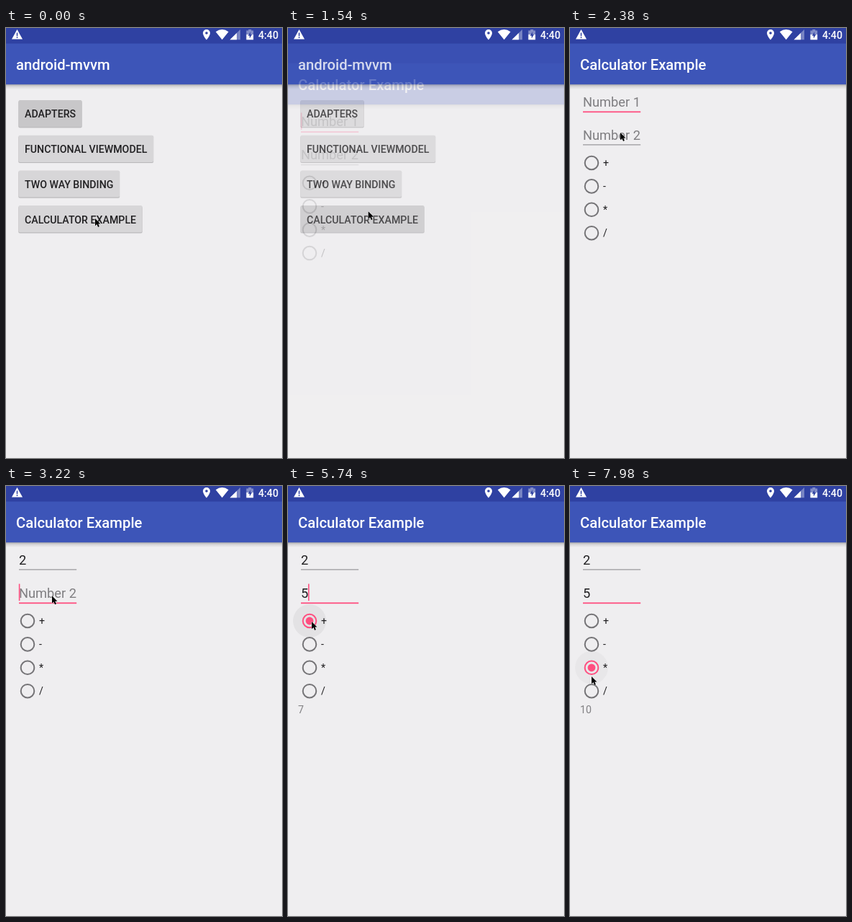
An HTML page for the animation above (8 s loop, 384 by 596 pixels).

```html
<!DOCTYPE html>
<html lang="en">
<head>
<meta charset="utf-8">
<title>Calculator Example</title>
<style>
html, body { margin: 0; width: 100%; height: 100%; overflow: hidden; background: #efeef0; }
svg { display: block; width: 100%; height: 100%; font-family: Roboto, sans-serif; }
.title { font-size: 20.3px; font-weight: 500; fill: #fff; }
.label { font-size: 14.2px; font-weight: 500; fill: #212022; }
.field { font-size: 18.27px; }
.small { font-size: 14.2px; fill: #212022; }
</style>
</head>
<body>
<svg viewBox="0 0 384 596" xmlns="http://www.w3.org/2000/svg">
  <defs>
    <linearGradient id="shade" x2="0" y2="1">
      <stop offset="0" stop-color="#000" stop-opacity=".3"/>
      <stop offset=".4" stop-color="#000" stop-opacity=".11"/>
      <stop offset="1" stop-color="#000" stop-opacity="0"/>
    </linearGradient>
    <g id="frame">
      <rect width="384" height="640" fill="#efeef0"/>
      <rect y="78" width="384" height="7" fill="url(#shade)"/>
      <rect y="-60" width="384" height="82" fill="#2f41a2"/>
      <rect y="21.5" width="384" height="56.7" fill="#3d55b8"/>
    </g>
  </defs>
  <g id="menu">
    <use href="#frame"/>
    <text class="title" x="14" y="57.8">android-mvvm</text>
  </g>
  <g id="calc">
    <use href="#frame"/>
    <text class="title" x="14" y="57.8">Calculator Example</text>
    <text id="result" class="small" x="14" y="315.4" style="fill:#838285"></text>
    <rect id="caret" width="1.6" height="23.5" fill="#ff4f80"/>
  </g>
  <g id="status" fill="#fff">
    <path d="M15.5 2L23 15.6H8z"/>
    <path d="M15.5 6.6v4.6M15.5 12.3v1.7" stroke="#2f41a2" stroke-width="1.5"/>
    <path fill-rule="evenodd" d="M279 2a5 5 0 0 1 5 5c0 3.700-5 9.500-5 9.500s-5-5.800-5-9.500a5 5 0 0 1 5-5zm0 3.200a1.800 1.800 0 1 0 0 3.600 1.800 1.800 0 0 0 0-3.600z"/>
    <path d="M291.800 5.200Q300.700-1 309.600 5.200L300.700 16.300z"/>
    <path d="M326 2v14.300H311.500z" opacity=".35"/>
    <path d="M321 7v9.300H311.500z"/>
    <path d="M337.300 2h4v1.500h2.900V9h-9.800V3.500h2.900z" opacity=".4"/>
    <path d="M334.400 9h9.800v7.300h-9.800z"/>
    <path d="M340.200 5.200l-3.500 5.600h2.200v3.800l3.300-5.700h-2z" fill="#2f41a2"/>
    <text x="351" y="14.700" font-size="14.200" font-weight="500">4:40</text>
  </g>
  <path id="mouse" d="M0 0v10.300l2.400-2.200 1.700 3.800 1.800-.8-1.600-3.600h3.200z" fill="#000" stroke="#fff" stroke-width=".8" stroke-opacity=".8" paint-order="stroke"/>
</svg>
<script>
const LOOP = 8000, PINK = '#ff4f80', GREY = '#757477';
const $ = id => document.getElementById(id);
const clamp = v => Math.max(0, Math.min(1, v));
const set = (el, attrs) => { for (const k in attrs) el.setAttribute(k, attrs[k]); };

function add(parent, tag, attrs, text) {
  const el = document.createElementNS('http://www.w3.org/2000/svg', tag);
  set(el, attrs);
  if (text) el.textContent = text;
  return parent.appendChild(el);
}

const buttons = [['ADAPTERS', 88], ['FUNCTIONAL VIEWMODEL', 187.5], ['TWO WAY BINDING', 140.5], ['CALCULATOR EXAMPLE', 172]]
  .map(([label, width], i) => {
    const y = 100 + i * 48.7, box = { x: 17.5, width, height: 37.2, rx: 2 };
    add($('menu'), 'rect', { ...box, x: 17, y: y + .6, width: width + 1, height: 38, fill: '#000', opacity: .08 });
    add($('menu'), 'rect', { ...box, y: y + 1, fill: '#b9b8ba' });
    const face = add($('menu'), 'rect', { ...box, y });
    add($('menu'), 'text', { class: 'label', x: 26, y: y + 24.4 }, label);
    return face;
  });

const fields = [0, 1].map(i => ({
  line: add($('calc'), 'rect', { x: 18, width: 80.2 }),
  text: add($('calc'), 'text', { class: 'field', x: 18, y: 108.6 + i * 46 })
}));

const radios = ['+', '-', '*', '/'].map((sign, i) => {
  const at = { cx: 30, cy: 187 + i * 32.4 };
  const ripple = add($('calc'), 'circle', { ...at, fill: '#000' });
  const ring = add($('calc'), 'circle', { ...at, r: 9.3, fill: 'none', 'stroke-width': 2 });
  const dot = add($('calc'), 'circle', { ...at, fill: PINK });
  add($('calc'), 'text', { class: 'small', x: 46, y: at.cy + 5 }, sign);
  return { ripple, ring, dot };
});
$('calc').append($('caret'));

// time, x, y
const path = [
  [0, 124, 264], [560, 120, 264], [1400, 113, 260], [1520, 112, 257], [1680, 106, 199],
  [1820, 105, 201], [2240, 73, 150], [2380, 70, 145], [2940, 68, 147], [3400, 62, 155],
  [4200, 59, 157], [4620, 58, 159], [5100, 33, 188], [5880, 33, 188], [6440, 32, 221],
  [6900, 32, 221], [7400, 31, 254], [7660, 31, 255], [7940, 30, 264], [8000, 30, 264]
];
const OPEN = 1510, TYPE_A = 2660, FOCUS_B = 3080, TYPE_B = 3780;
const picks = [[5500, '7'], [6720, '-3'], [7560, '10']];

function pointer(t) {
  const i = path.findIndex(p => p[0] > t);
  const [t0, x0, y0] = path[i - 1], [t1, x1, y1] = path[i];
  const k = (t - t0) / (t1 - t0), e = k * k * (3 - 2 * k);
  return `translate(${x0 + (x1 - x0) * e} ${y0 + (y1 - y0) * e})`;
}

function caretOn(t) {
  const start = t < TYPE_A ? 1540 : t < FOCUS_B ? TYPE_A : t < TYPE_B ? FOCUS_B : 4190;
  return t < start || (t - start) % 1040 < 520;
}

function drawFields(t) {
  const focus = t < FOCUS_B ? 0 : 1;
  const values = [t >= TYPE_A && '2', t >= TYPE_B && '5'];
  fields.forEach(({ line, text }, i) => {
    const on = i === focus;
    set(line, { y: 115.4 + i * 46, height: on ? 1.8 : 1, fill: on ? PINK : '#858487' });
    text.textContent = values[i] || 'Number ' + (i + 1);
    text.setAttribute('fill', values[i] ? '#212022' : '#7f7e81');
  });
  set($('caret'), {
    x: values[focus] ? 28 : 17.8,
    y: 89.6 + focus * 46,
    opacity: caretOn(t) ? 1 : 0
  });
}

function drawRadios(t) {
  const chosen = picks.filter(p => t >= p[0]).length - 1;
  radios.forEach(({ ripple, ring, dot }, i) => {
    const age = i < picks.length ? t - picks[i][0] : -1;
    const off = chosen > i ? t - picks[i + 1][0] : 0;
    const on = i === chosen;
    set(ring, { stroke: on ? PINK : GREY });
    set(dot, { r: 5.4 * (on ? clamp(age / 160) : chosen > i ? 1 - clamp(off / 120) : 0) });
    set(ripple, {
      r: 23 * clamp(age / 180),
      opacity: age < 0 ? 0 : .05 * (1 - clamp((age - 280) / 320))
    });
  });
  $('result').textContent = chosen < 0 ? '' : picks[chosen][1];
}

function draw(t) {
  const k = clamp((t - OPEN) / 300);
  set($('calc'), {
    transform: `translate(0 ${48 * (1 - k) ** 5})`,
    opacity: clamp((t - OPEN) / 150),
    visibility: t < OPEN ? 'hidden' : 'visible'
  });
  buttons.forEach((face, i) => {
    const dark = i === 0 ? t < 1260 : i === 3 && t >= 1430;
    face.setAttribute('fill', dark ? '#c8c7c9' : '#d7d6d8');
  });
  drawFields(t);
  drawRadios(t);
  $('mouse').setAttribute('transform', pointer(t));
}

function tick() {
  draw(performance.now() % LOOP);
  requestAnimationFrame(tick);
}
tick();
</script>
</body>
</html>
```
